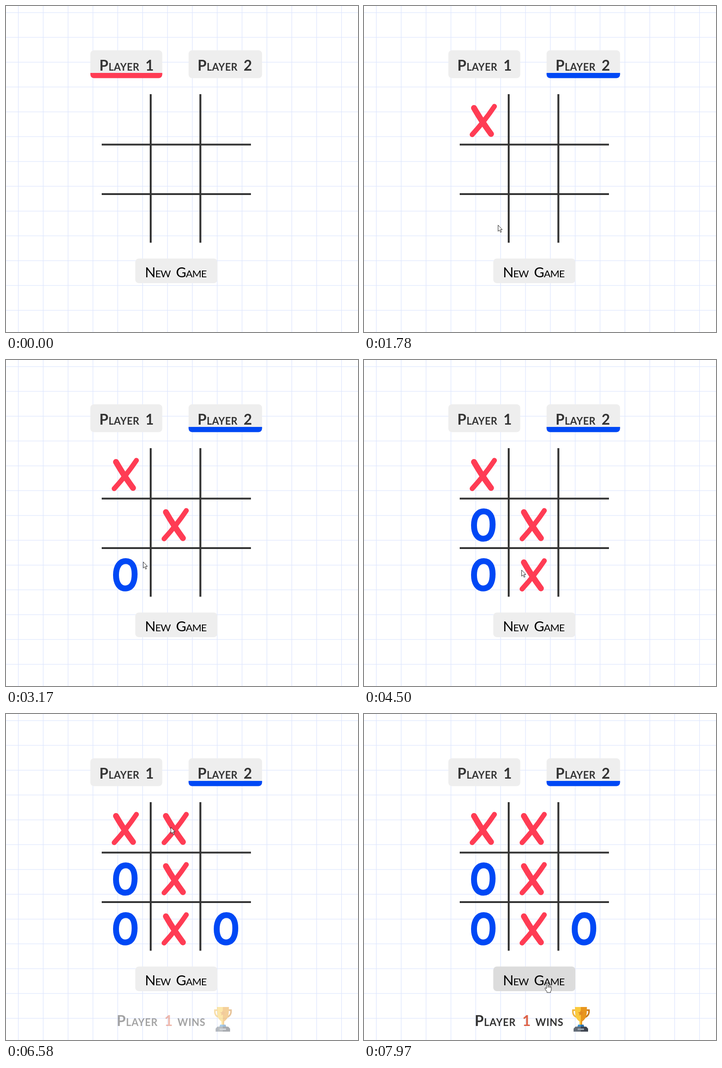
Animation, 776 px wide and 721 px high, one loop 8 s. Source, as an HTML page:

```html
<!DOCTYPE html>
<html lang="en">
<head>
<meta charset="utf-8">
<title>Tic-tac-toe</title>
<style>
  html, body { margin: 0; width: 100%; height: 100%; overflow: hidden; background: #fff; }
  svg { display: block; width: 100%; height: 100%; }
  text {
    font: 700 32px "Patrick Hand SC", Lato, "Open Sans", sans-serif;
    font-variant: small-caps;
    fill: #333;
  }
  .label { text-anchor: middle; letter-spacing: .4px; word-spacing: 5px; }
  .new { font-weight: 400; font-size: 31px; fill: #000; text-anchor: middle; letter-spacing: -.9px; word-spacing: 5px; }
  .wins { letter-spacing: .8px; }
  .x, .o { fill: none; stroke-linecap: round; stroke-linejoin: round; }
  .x { stroke: #ff3c54; }
  .o { stroke: #0048f5; stroke-width: 13; }
</style>
</head>
<body>
<svg viewBox="0 0 776 721">
  <defs>
    <g id="x" class="x">
      <path d="M242.5 225.5Q260 256 280 283" stroke-width="13"/>
      <path d="M287.5 222Q267 253 238.5 284.5" stroke-width="11"/>
    </g>
    <path id="o" class="o" d="M264 224.8C277 224.8 283.5 236 283.5 253.5C283.5 272 277 285.2 263 285.2C249 285.2 242.5 272 242.5 255.5C242.5 238 250 224.8 264 224.8Z"/>
    <clipPath id="clip1"><rect x="186" y="98" width="158.5" height="61.5" rx="8"/></clipPath>
    <clipPath id="clip2"><rect x="402.5" y="98" width="162" height="61.5" rx="8"/></clipPath>
  </defs>

  <rect width="776" height="721" fill="#fff"/>
  <path id="grid" fill="none" stroke="#dfe7fd" stroke-width="1.3"/>

  <g clip-path="url(#clip1)">
    <path d="M186 98h159v62h-159z" fill="#eee"/>
    <path id="turn1" d="M186 148h159v12h-159z" fill="#ff3c54"/>
  </g>
  <text class="label" x="266" y="142.5">Player 1</text>

  <g clip-path="url(#clip2)">
    <path d="M402 98h163v62h-163z" fill="#eee"/>
    <path id="turn2" d="M402 148h163v12h-163z" fill="#0048f5"/>
  </g>
  <text class="label" x="482.5" y="142.5">Player 2</text>

  <path d="M319 195V523.5M428.5 195V523.5M211 306.5H540M211 416H540" stroke="#333" stroke-width="4.2"/>
  <g id="marks"></g>

  <rect id="button" x="285" y="558.5" width="181" height="54.5" rx="8"/>
  <text class="new" x="374" y="600">New Game</text>

  <g id="win">
    <text class="wins" y="690"><tspan x="244">Player</tspan> <tspan x="349" fill="#dd6248">1</tspan> <tspan x="378">wins</tspan></text>
    <g fill="none" stroke-width="3.4">
      <path d="M467 655H460.5V660Q461 668 470 671" stroke="#f0b43c"/>
      <path d="M489 655H496V660Q495 668 486 671" stroke="#c97a1c"/>
    </g>
    <path d="M465 648H478V689H475V680Q466 674 465.5 662Z" fill="#fbca3e"/>
    <path d="M478 648H491.5L491 662Q490 674 481 680V689H478Z" fill="#e8961e"/>
    <path d="M478 655.5l1.8 4 4.3.4-3.3 2.8 1 4.3-3.8-2.3-3.8 2.3 1-4.3-3.3-2.8 4.3-.4z" fill="#e08a24"/>
    <path d="M472 687H478V693H470Z" fill="#3f93cf"/>
    <path d="M478 687H484L486 693H478Z" fill="#2b6fa8"/>
    <path d="M466 691.5H478V702.5H462V696Z" fill="#626b76"/>
    <path d="M478 691.5H490L494 696V702.5H478Z" fill="#3b424d"/>
    <path d="M471 695.5H485V699H471Z" fill="#9aa3ac"/>
  </g>

  <g id="cursor" fill="#fff" stroke="#222" stroke-width="1" stroke-linejoin="round">
    <path id="arrow" d="M.5 .5V14.2L3.6 11.4L5.8 16.5L7.9 15.6L5.7 10.5H9.8Z"/>
    <path id="hand" d="M-1.6 1.2Q0 -.8 1.5 1.2V7.6Q3 6 4.2 7.9Q5.8 6.8 6.8 8.7Q8.8 8 9 10.3V15Q9 17.5 7.5 19.3V22H-.8V19.7Q-3 17.3-4.8 13.7Q-5.2 11-3 11.7L-1.6 13.4ZM1.5 7.6V11.4M4.2 8V11.6M6.8 8.8V11.8"/>
  </g>
</svg>
<script>
  const LOOP = 8000;
  const ENTER = 260;
  const FADE = 250;
  const BOW = 0.25;
  const CELL = 110;
  const BOARD = { x: 209, y: 197 };

  // Pointer stops: arrival time, x, y
  const STOPS = [
    [ENTER, 703, 716], [750, 242, 253], [1430, 342, 412], [1750, 296, 484],
    [1970, 268, 474], [2580, 372, 360], [3170, 302, 446], [3410, 262, 372],
    [4240, 347, 464], [5390, 491, 468], [5980, 470, 383], [6460, 363, 250],
    [7370, 432, 500], [7960, 404, 594]
  ];
  const CLICKS = [950, 2000, 2640, 3800, 4410, 5390, 6470];
  const WIN = CLICKS[CLICKS.length - 1];

  const el = id => document.getElementById(id);
  const clamp = v => Math.min(1, Math.max(0, v));
  const ease = p => p * p * (3 - 2 * p);
  const bezier = (a, b, c, p) => (1 - p) ** 2 * a + 2 * p * (1 - p) * b + p * p * c;
  const show = (node, on) => node.setAttribute("visibility", on ? "visible" : "hidden");

  // Longer ways take more time; every way bows to the same side
  function pointer(t) {
    const next = STOPS.findIndex(([time]) => time > t);
    if (next < 1) return STOPS[next ? STOPS.length - 1 : 0].slice(1);
    const [from, x0, y0] = STOPS[next - 1];
    const [to, x1, y1] = STOPS[next];
    const dx = x1 - x0, dy = y1 - y0;
    const span = Math.min(to - from, 480, 150 + 2 * Math.hypot(dx, dy));
    const p = ease(clamp(1 - (to - t) / span));
    return [
      bezier(x0, (x0 + x1) / 2 + BOW * dy, x1, p),
      bezier(y0, (y0 + y1) / 2 - BOW * dx, y1, p)
    ];
  }

  // Each click marks the cell under the pointer, X and O in turn
  const marks = CLICKS.map((time, i) => {
    const [x, y] = pointer(time);
    const col = Math.floor((x - BOARD.x) / CELL);
    const row = Math.floor((y - BOARD.y) / CELL);
    const mark = document.createElementNS("http://www.w3.org/2000/svg", "use");
    mark.setAttribute("href", i % 2 ? "#o" : "#x");
    mark.setAttribute("x", col * (i % 2 ? 111 : CELL));
    mark.setAttribute("y", row * (i % 2 ? CELL : 111));
    return el("marks").appendChild(mark);
  });

  let grid = "";
  for (let x = 27.2; x < 776; x += 54.8) grid += `M${x} 0V721`;
  for (let y = 14.6; y < 721; y += 54.87) grid += `M0 ${y}H776`;
  el("grid").setAttribute("d", grid);

  function draw(t) {
    const played = CLICKS.filter(time => t >= time).length;
    marks.forEach((mark, i) => show(mark, i < played));
    show(el("turn1"), played % 2 === 0);
    show(el("turn2"), played % 2 === 1);

    const [x, y] = pointer(t);
    const hover = x > 285 && x < 466 && y > 558 && y < 613;
    el("cursor").setAttribute("transform", `translate(${x.toFixed(1)} ${y.toFixed(1)})`);
    show(el("arrow"), t >= ENTER && !hover);
    show(el("hand"), t >= ENTER && hover);
    el("button").setAttribute("fill", hover ? "#dcdcdc" : "#eee");
    el("win").setAttribute("opacity", clamp((t - WIN) / FADE));
  }

  const begin = performance.now();
  function tick() {
    draw((performance.now() - begin) % LOOP);
    requestAnimationFrame(tick);
  }
  tick();
</script>
</body>
</html>
```
